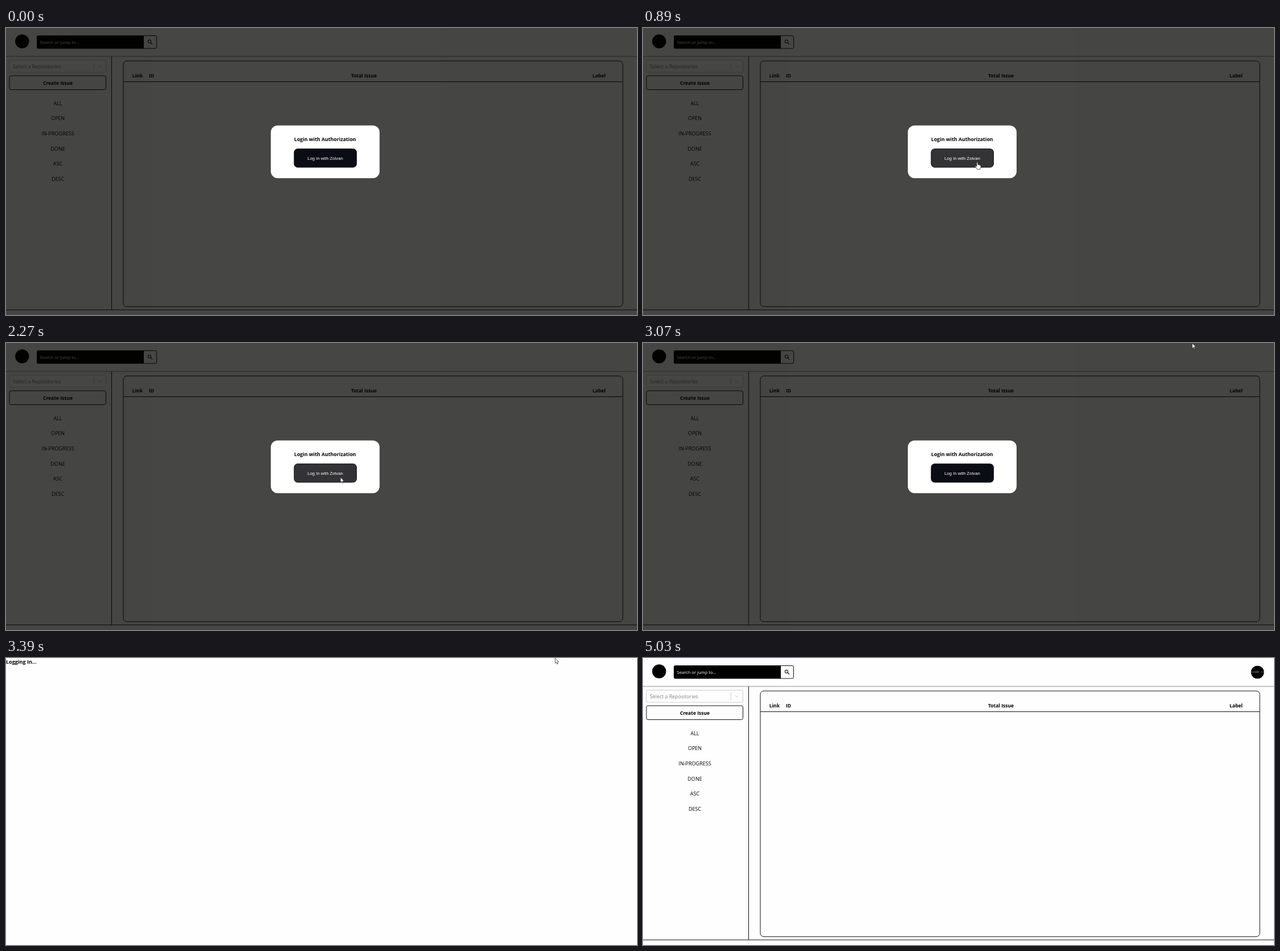
Write an HTML page that moves like this. It is 1108 by 505 pixels and loops after 5840 ms.

```html
<!DOCTYPE html>
<html lang="en">
<head>
<meta charset="utf-8">
<title>Issue tracker login</title>
<style>
  html, body { margin: 0; width: 100%; height: 100%; overflow: hidden; background: #fefefe; }
  svg { display: block; width: 100%; height: 100%; }
  text { font: 500 9px "Open Sans", "Noto Sans", sans-serif; }
  .bold { font-weight: 700; font-size: 8.5px; }
  .mid { text-anchor: middle; }
  .line { fill: none; stroke: #111; }
  .pointer { fill: #fff; stroke: #222; stroke-width: .7; stroke-linejoin: round; }

  /* Scene changes share one 5840 ms clock and switch hard. */
  .login, .loading, .page, .avatar, .hand, .arrow, .button, .cursor-box {
    animation: 5840ms step-end infinite;
  }
  .login { animation-name: login; }
  .loading { animation-name: loading; }
  .page { animation-name: page; }
  .avatar { animation-name: avatar; }
  .hand { animation-name: hand; }
  .arrow { animation-name: arrow; }
  .button { animation-name: hover; }
  .cursor-box { animation-name: present; }
  .cursor { animation: travel 5840ms linear infinite; }

  @keyframes login { 0% { opacity: 1 } 58.048%, 100% { opacity: 0 } }
  @keyframes loading { 0% { opacity: 0 } 58.048% { opacity: 1 } 72.26%, 100% { opacity: 0 } }
  @keyframes page { 0% { opacity: 1 } 58.048% { opacity: 0 } 72.26%, 100% { opacity: 1 } }
  @keyframes avatar { 0% { opacity: 0 } 72.26%, 100% { opacity: 1 } }
  @keyframes present { 0% { opacity: 0 } 6.164% { opacity: 1 } 86.13%, 100% { opacity: 0 } }
  @keyframes hover { 0% { fill: #0a0d14 } 9.247% { fill: #333335 } 44.349%, 100% { fill: #0a0d14 } }
  @keyframes hand {
    0% { opacity: 0 } 9.247% { opacity: 1 } 38.87% { opacity: 0 }
    40.068% { opacity: 1 } 44.349%, 100% { opacity: 0 }
  }
  @keyframes arrow {
    0% { opacity: 1 } 9.247% { opacity: 0 } 38.87% { opacity: 1 }
    40.068% { opacity: 0 } 44.349%, 100% { opacity: 1 }
  }
  @keyframes travel {
    0%, 6.164% { transform: translate(656px, 193px) }
    9.247% { transform: translate(614px, 234px) }
    11% { transform: translate(597px, 245px) }
    15.24%, 43.493% { transform: translate(587px, 236px) }
    45.205% { transform: translate(700px, 205px) }
    47.26% { transform: translate(905px, 142px) }
    49.315% { transform: translate(1046px, 60px) }
    51.027% { transform: translate(1000px, 10px) }
    52.568%, 100% { transform: translate(964px, 0) }
  }
</style>
</head>
<body>
<svg viewBox="0 0 1108 505" preserveAspectRatio="none">
  <defs><clipPath id="round"><circle cx="1079" cy="25" r="11.6"/></clipPath></defs>
  <rect width="1108" height="505" fill="#fefefe"/>

  <g class="page">
    <circle cx="28.3" cy="23.5" r="12.2"/>
    <path d="M57 13H242V36.5H57Q54 36.5 54 33.5V16Q54 13 57 13Z"/>
    <path class="line" d="M242 13.5H262Q264.5 13.5 264.5 16V33.5Q264.5 36 262 36H242"/>
    <text x="59.5" y="27.7" fill="#fff" style="font-size:7.6px;font-weight:400">Search or jump to...</text>
    <g fill="none" stroke="#333" stroke-width="1.2">
      <circle cx="252" cy="23.7" r="2.6"/>
      <path d="M254 25.7L257 28.7" stroke-width="1.5"/>
    </g>

    <path d="M0 50H1108" stroke="#888"/>
    <path class="line" d="M185.5 50V496M0 496H1108"/>

    <rect x="6" y="56.5" width="169.5" height="21.5" rx="2" fill="#fff" stroke="#ccc"/>
    <path d="M154.3 61V74M161.8 66L165 69.2L168.2 66" fill="none" stroke="#ccc"/>
    <text x="12" y="71" fill="#808080" style="font-size:8.8px;font-weight:400">Select a Repositories</text>
    <rect class="line" x="6" y="84" width="169.5" height="24.5" rx="3"/>
    <text class="bold mid" x="91" y="100.2">Create Issue</text>
    <g class="mid">
      <text x="91" y="135.8">ALL</text>
      <text x="91" y="162.4">OPEN</text>
      <text x="91" y="189">IN-PROGRESS</text>
      <text x="91" y="215.6">DONE</text>
      <text x="91" y="242.2">ASC</text>
      <text x="91" y="268.8">DESC</text>
    </g>

    <rect class="line" x="206" y="58" width="877" height="432.3" rx="6"/>
    <path class="line" d="M206 94.5H1083"/>
    <text class="bold" x="221.7" y="86.8">Link</text>
    <text class="bold" x="251" y="86.8">ID</text>
    <text class="bold mid" x="628.5" y="86.8">Total Issue</text>
    <text class="bold mid" x="1041.5" y="86.8">Label</text>

    <g class="avatar" clip-path="url(#round)">
      <circle cx="1079" cy="25" r="11.6"/>
      <text class="mid" x="1079" y="26.4" fill="#aaa" style="font:4.6px 'DejaVu Sans Mono',monospace">&lt;code /&gt;</text>
    </g>
  </g>

  <g class="login">
    <rect width="1108" height="505" fill="rgb(4,4,0)" fill-opacity=".735"/>
    <rect x="465" y="171.5" width="191" height="92.7" rx="12" fill="#fff"/>
    <text class="bold mid" x="560.3" y="198.8" style="font-size:8.75px">Login with Authorization</text>
    <rect class="button" x="506" y="212.7" width="109.5" height="32.4" rx="6" fill="#0a0d14" stroke="#0a0d14"/>
    <text class="mid" x="560.5" y="231.8" fill="#fff" style="font:7.69px 'Liberation Sans',Arial,sans-serif">Log In with Zolvan</text>
  </g>

  <text class="bold loading" x="0" y="9.8" style="font-size:9px">Logging In...</text>

  <g class="cursor-box">
    <g class="cursor">
      <path class="pointer arrow" d="M.3 .3V9.4L2.4 7.4L3.8 10.7L5.2 10.1L3.8 6.9H6.6Z"/>
      <path class="pointer hand" d="M-1 1Q-1 .2 0 .2T1 1V4.4Q2.6 4 2.9 5Q4.3 4.6 4.7 5.6Q6.2 5.2 6.2 6.8V9Q6 10.6 5 11.3V12.7H-.6V11.6Q-2.4 9.8-3.6 7.6Q-3.8 6.3-2.6 6.5L-1 8Z"/>
    </g>
  </g>
</svg>
</body>
</html>
```
